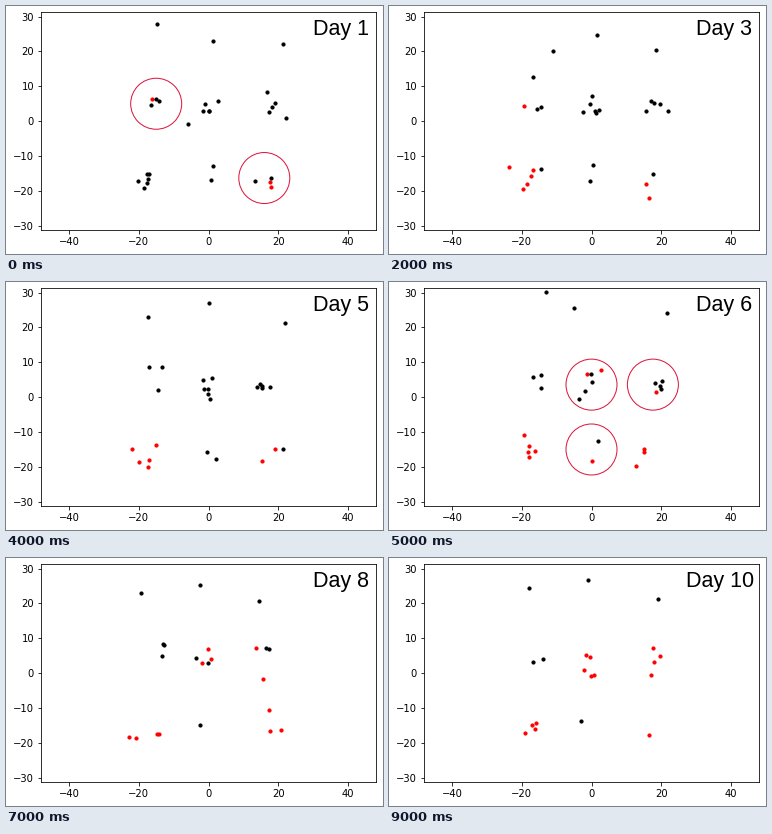
Animation, 377 px wide and 248 px high, one loop 10 s. Source, as a matplotlib script:

```python
import numpy as np
import matplotlib.pyplot as plt
from matplotlib.animation import FuncAnimation

W, H, DPI = 377, 248, 72
AX_X, AX_Y, AX_W, AX_H = 35.1, 24.1, 334.8, 217.44
HALF_X = 48
HALF_Y = HALF_X * AX_H / AX_W         # equal scale on both axes
DAYS = 10
SPREAD = (2.2, 2.3)                   # daily wandering around home
NEVER = DAYS + 1
WELL = (NEVER, NEVER)

# home centre, then (day of falling ill, day of leaving) for each person
HOUSEHOLDS = [
    ((-15.5, 26), [WELL]),
    ((0.7, 26), [WELL]),
    ((19.5, 21), [WELL]),
    ((-15, 5), [(1, 4), WELL, WELL, (NEVER, 10)]),
    ((0, 3.6), [(6, 7), (6, NEVER), (8, NEVER), (8, NEVER), (9, NEVER),
                (10, NEVER)]),
    ((17.6, 3.6), [(6, 8), (8, NEVER), (8, NEVER), (9, NEVER), (9, NEVER)]),
    ((-17.5, -15.5), [(2, NEVER), (2, NEVER), (3, NEVER), (3, NEVER),
                      (3, 5), (4, 7)]),
    ((0, -15), [(6, 7), WELL]),
    ((16, -16.3), [(1, 3), (1, 9), (2, 10), (6, NEVER)]),
]


def as_points(points):
    return np.array(points, float).reshape(-1, 2)


def state(day):
    """Positions of ill people, healthy people and outbreak rings."""
    rng = np.random.default_rng(day)
    ill, healthy, rings = [], [], []
    for home, people in HOUSEHOLDS:
        for sick, gone in people:
            spot = rng.normal(home, SPREAD)
            if day < gone:
                (ill if day >= sick else healthy).append(spot)
        if day == min(sick for sick, _ in people):
            rings.append(home)
    return [as_points(p) for p in (ill, healthy, rings)]


plt.rcParams.update({"font.family": "DejaVu Sans", "font.size": 10})
# the small margin keeps the size from rounding down a pixel
fig = plt.figure(figsize=((W + 1e-6) / DPI, (H + 1e-6) / DPI), dpi=DPI,
                 facecolor="white")
ax = fig.add_axes([AX_X / W, AX_Y / H, AX_W / W, AX_H / H])
ax.set_xlim(-HALF_X, HALF_X)
ax.set_ylim(-HALF_Y, HALF_Y)
ax.set_xticks(range(-40, 41, 20))
ax.set_yticks(range(-30, 31, 10))


def marks(face, edge, size, z):
    return ax.scatter([], [], s=size, facecolors=face, edgecolors=edge,
                      linewidths=1, zorder=z)


layers = [
    marks("red", "red", 10, 2),
    marks("black", "black", 10, 3),
    marks("none", "crimson", 51 ** 2, 4),
]
label = ax.text(30, 24.8, "", family="Liberation Sans", size=21.5, zorder=5)


def draw(i):
    day = i + 1
    for layer, points in zip(layers, state(day)):
        layer.set_offsets(points)
    label.set_text(f"Day {day}")
    label.set_x(30 if day < 10 else 27)
    return [*layers, label]


anim = FuncAnimation(fig, draw, frames=DAYS, interval=1000, repeat=True,
                     repeat_delay=0, init_func=lambda: draw(0))
plt.show()
```
